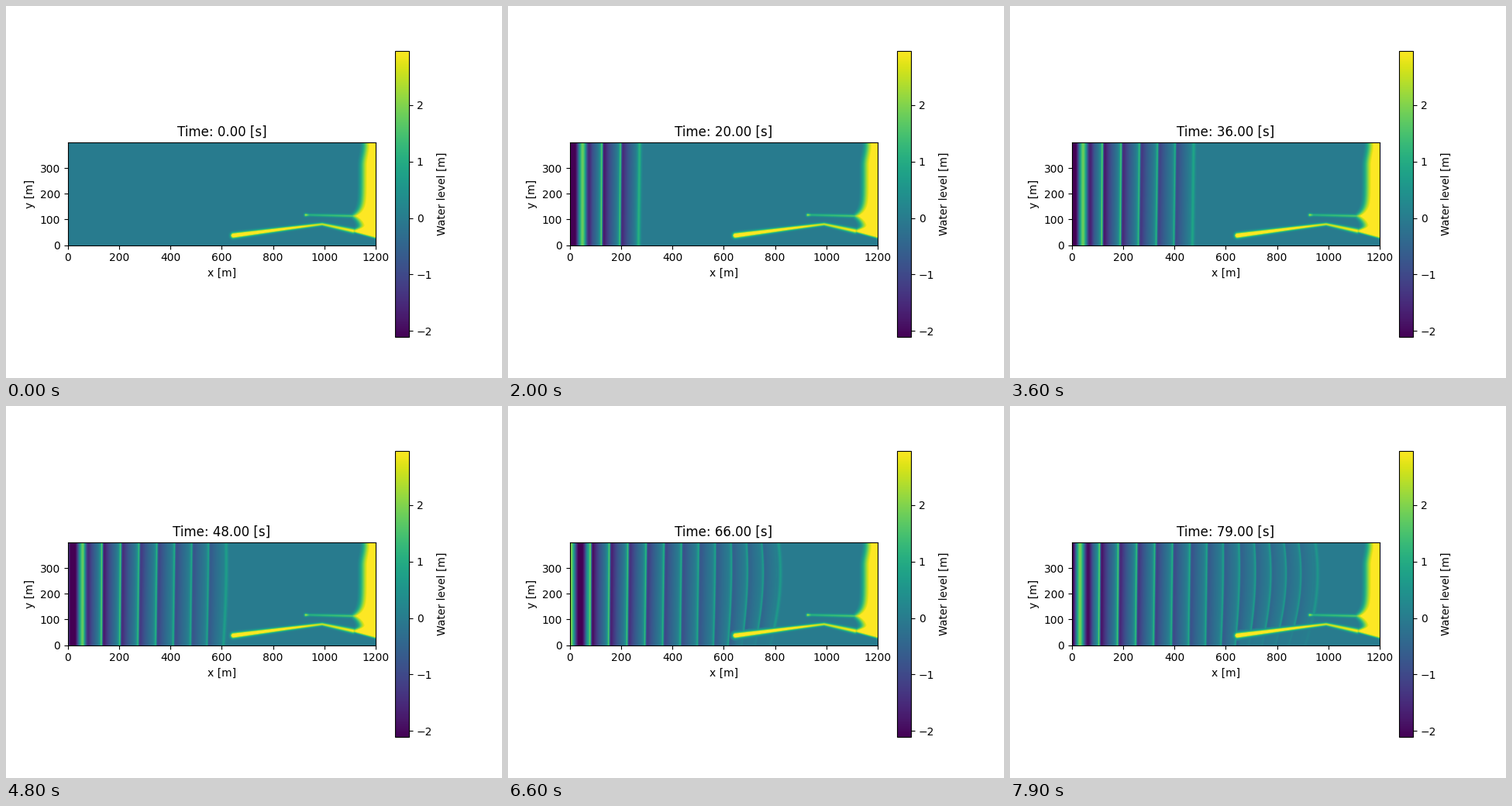
A matplotlib script that plays this animation: 640 by 480 pixels, repeating every 8000 ms.

```python
import numpy as np
import matplotlib.pyplot as plt
from matplotlib.animation import FuncAnimation

FRAMES, INTERVAL = 80, 100
WIDTH, HEIGHT = 1200, 400
VMIN, VMAX = -2.109, 2.964

# Crest k periods after the inlet stands at START + STEP * k - SLOW * k^2
PERIOD, START, STEP, SLOW = 5.48, 31, 75.6, 0.704
FRONT_END = 14  # periods travelled by the front at the last second

X, Y = np.meshgrid(np.linspace(0, WIDTH, 601), np.linspace(0, HEIGHT, 201))


def smooth(v):
    v = np.clip(v, 0, 1)
    return v * v * (3 - 2 * v)


def bell(v, mid, width):
    return np.exp(-((v - mid) / width) ** 2)


def ridge(points):
    """Bell-shaped bank along a polyline of (x, y, height, half width)."""
    out = np.zeros_like(X)
    for (x0, y0, h0, w0), (x1, y1, h1, w1) in zip(points, points[1:]):
        dx, dy = x1 - x0, y1 - y0
        s = np.clip(((X - x0) * dx + (Y - y0) * dy) / (dx * dx + dy * dy), 0, 1)
        d = np.hypot(X - x0 - s * dx, Y - y0 - s * dy)
        out = np.maximum(out, (h0 + s * (h1 - h0)) * bell(d, 0, w0 + s * (w1 - w0)))
    return out


# Dry ground: sloping shore, breakwater and jetty
WALL = [(645, 38, 4.2, 10), (862, 66, 3.4, 7), (992, 82, 2.6, 6), (1113, 56, 3, 9)]
JETTY = [(928, 118, 2.4, 6), (942, 118, 1.2, 5), (1110, 114, 1.6, 6)]

coast = 1150 + 10 * smooth((Y - 310) / 80)
coast -= 42 * np.exp(-np.abs(Y - 114) / 22) + 45 * bell(Y, 52, 14)
south = 53 - 0.27 * (X - 1107)
shore = 3.1 * smooth((X - coast + 25) / 50) * smooth((Y - south + 7) / 14)
LAND = np.maximum.reduce([shore, ridge(WALL), ridge(JETTY)])

# Wave travel, measured in periods, with crests bending over the shoals
lag = 25 * ((Y - 270) / 200) ** 2 * smooth((X - 500) / 400)
lag += 5 * (1 - Y / HEIGHT) * np.clip(X / 300, 0, 1)
PHASE = (STEP - np.sqrt(STEP ** 2 - 4 * SLOW * (X + lag - START))) / (2 * SLOW)

CREST = 0.6 + 1.9 * np.exp(-X / 350)
TROUGH = 2.5 * np.exp(-X / 430)
STEEP = smooth((X - 55) / 35)

wall_x, wall_y = np.array(WALL)[:, :2].T
behind_wall = smooth((X - 640) / 20) * smooth((np.interp(X, wall_x, wall_y) - Y) / 10 + 0.5)
behind_jetty = smooth((X - 920) / 20) * smooth((118 - Y) / 15 + 0.5)
CALM = (1 - 0.8 * behind_wall) * (1 - 0.7 * behind_jetty)


def water(t):
    ahead = PHASE - FRONT_END + (FRAMES - 1 - t) / PERIOD
    q = ahead % 1
    turn = 2 * np.pi * q
    swell = np.cos(turn + 0.38 * np.sin(turn))
    swell *= np.where(swell > 0, 0.8 * CREST, TROUGH)
    spike = bell(q, 0, 0.05) + np.exp((q - 1) / 0.07)
    hollow = 1.25 * (1 - q) ** 1.5 * (1 - bell(q, 0, 0.08))
    bore = CREST * spike - TROUGH * hollow
    level = swell + STEEP * (bore - swell)
    front = 0.8 * np.minimum(CREST, 1.4) * bell(ahead, 0.002 * t, 0.11)
    return np.where(ahead > -0.12, front, level) * CALM * min(t / 2, 1)


def surface(t):
    level = water(t)
    return np.where(LAND > 0.05, np.maximum(level, LAND), level)


fig, ax = plt.subplots(figsize=(6.4, 4.8), dpi=100)
image = ax.imshow(surface(0), origin="lower", extent=(0, WIDTH, 0, HEIGHT),
                  cmap="viridis", vmin=VMIN, vmax=VMAX)
ax.set_xlabel("x [m]")
ax.set_ylabel("y [m]")
ax.set_xticks(range(0, 1201, 200))
ax.set_yticks(range(0, 301, 100))
title = ax.set_title("Time: 0.00 [s]")
fig.colorbar(image, ax=ax, label="Water level [m]", ticks=range(-2, 3))


def update(frame):
    image.set_data(surface(frame))
    title.set_text(f"Time: {frame:.2f} [s]")
    return image, title


anim = FuncAnimation(fig, update, frames=FRAMES, interval=INTERVAL,
                     repeat=True, repeat_delay=0, blit=False)
plt.show()
```
